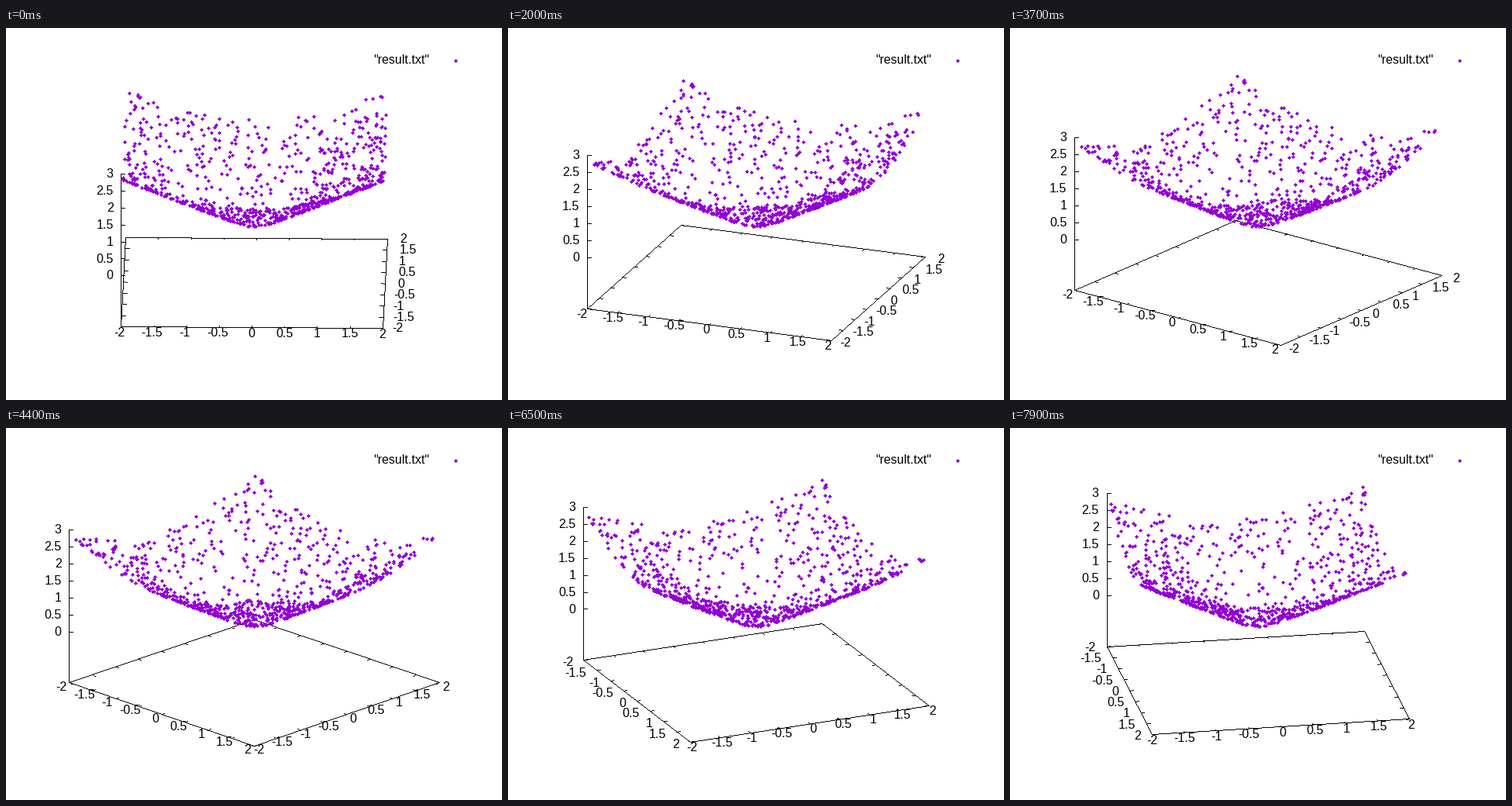
Animation, 640 px wide and 480 px high, one loop 8 s. Source, as a matplotlib script:

```python
import numpy as np
import matplotlib.pyplot as plt
from matplotlib.animation import FuncAnimation

W, H, DPI = 640, 480, 100
FRAMES, INTERVAL = 80, 100
CX, CY = 320, 328.5                  # centre of the base square
HALF = 168.7                         # half of the base side in pixels
TILT = np.cos(np.radians(70))
Z_UNIT, Z_BASE = 43.87, 65.8         # pixels per z unit, gap below z = 0
TIC = 5
PURPLE = (148, 0, 211)
FONT = dict(family="Liberation Sans", fontsize=16 * 72 / DPI, color="black",
            va="baseline")
TICKS = np.arange(-2, 2.1, 0.5)
Z_TICKS = np.arange(0, 3.1, 0.5)


def make_cloud():
    """Random samples of a cone with a rounded tip, denser in the near half."""
    rng = np.random.default_rng(12)
    even = rng.uniform(-2, 2, (620, 2))
    near = np.sort(rng.uniform(-2, 2, (250, 2)))[:, ::-1]
    x, y = np.vstack([even, near]).T
    return x, y, np.sqrt(x**2 + y**2 + 0.035)


def project(x, y, angle):
    """Screen position of a point of the base plane."""
    c, s = np.cos(angle), np.sin(angle)
    k = HALF / 2
    return CX + k * (x * c + y * s), CY + k * TILT * (x * s - y * c)


def pixel(v):
    return np.rint(v).astype(int)


def draw_line(canvas, x0, y0, x1, y1):
    """Hard-edged line, one pixel wide."""
    x0, y0, x1, y1 = pixel(np.array([x0, y0, x1, y1]))
    n = max(abs(x1 - x0), abs(y1 - y0)) + 1
    canvas[pixel(np.linspace(y0, y1, n)), pixel(np.linspace(x0, x1, n))] = 0


def draw_dots(canvas, x, y):
    """Filled diamonds, five pixels across."""
    x, y = pixel(x), pixel(y)
    for dy in range(-2, 3):
        reach = 2 - abs(dy)
        for dx in range(-reach, reach + 1):
            canvas[y + dy, x + dx] = PURPLE


def draw_tic(canvas, x, y, dx, dy):
    draw_line(canvas, x, y, x + TIC * dx, y + TIC * TILT * dy)


fig = plt.figure(figsize=(W / DPI, H / DPI), dpi=DPI, facecolor="white")
ax = fig.add_axes([0, 0, 1, 1])
picture = ax.imshow(np.full((H, W, 3), 255, np.uint8), aspect="auto",
                    interpolation="nearest")
ax.axis("off")
ax.text(545.5, 46, '"result.txt"', ha="right", **FONT)


def make_labels(values):
    return [ax.text(0, 0, f"{v:g}", **FONT) for v in values]


x_labels, y_labels, z_labels = map(make_labels, (TICKS, TICKS, Z_TICKS))
cloud_x, cloud_y, cloud_z = make_cloud()


def place_label(label, value, x, y, dx, dy):
    """Set a label outwards along (dx, dy); positives carry a blank."""
    x += 11.9 * dx
    y += 7.4 * dy
    blank = 4.4 if value >= 0 else 0
    if dx < -0.75:
        align, shift = "right", -2.8
    elif dx > 0.75:
        align, shift = "left", blank
    else:
        align, shift = "center", blank / 2 - 2.5
    label.set_ha(align)
    label.set_position((x + shift, y + 4.6))


def update(i):
    angle = np.radians(i + 1)
    c, s = np.cos(angle), np.sin(angle)
    canvas = np.full((H, W, 3), 255, np.uint8)

    for e in (-2, 2):
        draw_line(canvas, *project(-2, e, angle), *project(2, e, angle))
        draw_line(canvas, *project(e, -2, angle), *project(e, 2, angle))

    for v, x_label, y_label in zip(TICKS, x_labels, y_labels):
        front, right = project(v, -2, angle), project(2, v, angle)
        draw_tic(canvas, *front, s, -c)
        draw_tic(canvas, *project(v, 2, angle), -s, c)
        draw_tic(canvas, *right, -c, -s)
        draw_tic(canvas, *project(-2, v, angle), c, s)
        place_label(x_label, v, *front, -s, c)
        place_label(y_label, v, *right, c, s)

    zx, zy = project(-2, -2, angle)
    draw_line(canvas, zx, zy, zx, zy - Z_BASE - 3 * Z_UNIT)
    for v, label in zip(Z_TICKS, z_labels):
        y = zy - Z_BASE - v * Z_UNIT
        draw_tic(canvas, zx, y, 1, 0)
        label.set_ha("right")
        label.set_position((zx - 10.3, y + 4.6))

    px, py = project(cloud_x, cloud_y, angle)
    draw_dots(canvas, px, py - Z_BASE - cloud_z * Z_UNIT)
    draw_dots(canvas, np.array([580]), np.array([42]))
    picture.set_data(canvas)
    return [picture, *x_labels, *y_labels, *z_labels]


anim = FuncAnimation(fig, update, frames=FRAMES, interval=INTERVAL,
                     repeat=True, repeat_delay=0, blit=False)
plt.show()
```
